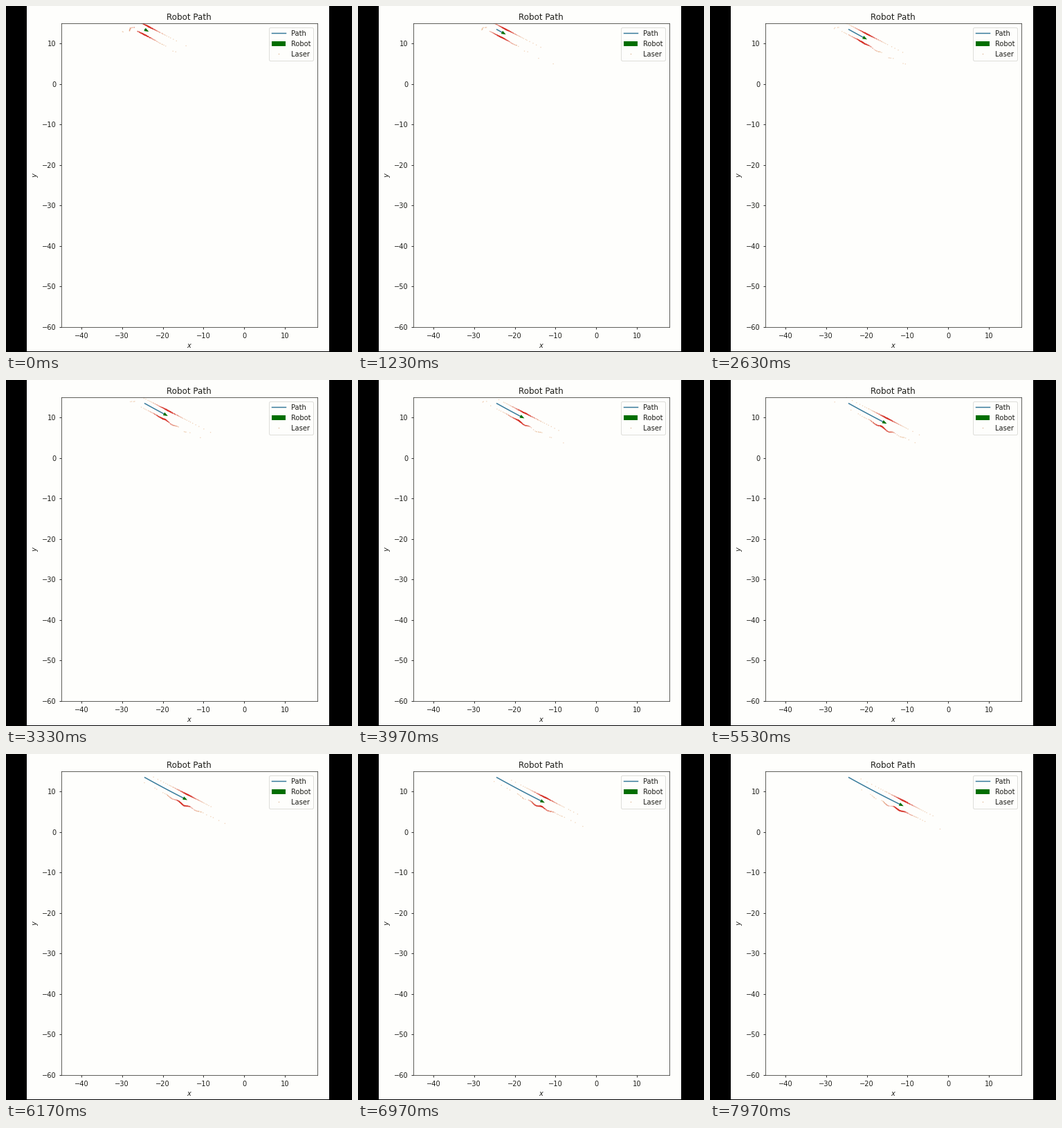
Recreate the animation shown at these times as a matplotlib script. Size 500x500 px, loop 8000 ms.

```python
import matplotlib.pyplot as plt
import numpy as np
from matplotlib.animation import FuncAnimation
from matplotlib.lines import Line2D
from matplotlib.patches import Patch, Polygon, Rectangle

FRAMES = 240
LOOP = 8000
SIZE = 500
PT = 0.715  # points per default-style point
PAPER = "#fefefc"
INK = "#1e1e1a"
PATH = "#35799a"
ROBOT = "#006e00"

plt.rcParams.update({
    "font.family": "DejaVu Sans",
    "font.size": 10 * PT,
    "axes.titlesize": 12 * PT,
    "axes.titlepad": 5.3 * PT,
    "axes.linewidth": 0.8 * PT,
    "axes.edgecolor": "#383834",
    "axes.labelcolor": INK,
    "text.color": INK,
})
for axis, pad in (("xtick", 4.9), ("ytick", 3.5)):
    plt.rcParams[axis + ".major.size"] = 3.5 * PT
    plt.rcParams[axis + ".major.pad"] = pad * PT
    plt.rcParams[axis + ".major.width"] = 0.8 * PT
    plt.rcParams[axis + ".labelcolor"] = INK

# Motion, in metres and seconds
START, END = -24.4, -10.95
SPEED, RAMP = 1.67, 0.5
MAX_RANGE = 16
NEAR = np.array([0.84, 0.14, 0.10, 0.36])
FAR = np.array([0.88, 0.62, 0.40, 0.45])
BODY = np.array([(0.62, 0), (-0.5, 0.42), (-0.5, -0.42)])


def robot_x(t):
    """Pull away gently, then hold a steady speed."""
    return -23.97 + SPEED * (t - RAMP * (1 - np.exp(-t / RAMP)))


def route_y(x):
    u = x - START
    return 13.47 - 0.526 * u - 0.0025 * u * (END - START - u)


def upper_y(x):
    return 3.3 - 0.516 * (x + 2.4)


def lower_y(x):
    bay = np.exp(-((x + 15) / 5) ** 2)
    return 1.4 - 0.509 * (x + 3.3) - bay * (0.5 - 0.25 * np.cos(2.1 * (x + 19.3)))


def wall(f, x0, x1, n):
    x = np.linspace(x0, x1, n)
    return np.column_stack([x, f(x)])


walls = [wall(upper_y, -28, 4, 2), wall(lower_y, -26.2, 2, 60),
         np.array([(-30.9, 13.8), (-29.7, 12.8)]),
         np.array([(-28.2, 13.1), (-27.9, 13.9), (-26.8, 14)])]
seg_a = np.vstack([w[:-1] for w in walls])
seg_d = np.vstack([np.diff(w, axis=0) for w in walls])


def scan(pos, rng):
    """Cast one turn of laser rays against the walls."""
    ang = np.radians(np.arange(360) + rng.uniform())
    ray = np.column_stack([np.cos(ang), np.sin(ang)])[:, None, :]
    rel = seg_a - pos
    det = ray[..., 0] * seg_d[:, 1] - ray[..., 1] * seg_d[:, 0]
    dist = (rel[:, 0] * seg_d[:, 1] - rel[:, 1] * seg_d[:, 0]) / det
    along = (rel[:, 0] * ray[..., 1] - rel[:, 1] * ray[..., 0]) / det
    hit = (dist > 0) & (along >= 0) & (along <= 1)
    reach = np.where(hit, dist, np.inf).min(axis=1)
    keep = reach < MAX_RANGE * rng.uniform(0.3, 1, len(ang))
    r = reach[keep] + rng.normal(0, 0.06, keep.sum())
    mix = np.clip((r - 1.8) / 3.2, 0, 1)[:, None]
    return pos + ray[keep, 0] * r[:, None], NEAR + (FAR - NEAR) * mix


fig = plt.figure(figsize=(5, 5), dpi=100, facecolor="black")
fig.add_artist(Rectangle((30 / SIZE, 1 / SIZE), 437 / SIZE, 1, fc=PAPER, lw=0,
                         transform=fig.transFigure, zorder=-1))
ax = fig.add_axes([79.5 / SIZE, 36.5 / SIZE, 370.5 / SIZE, 438.5 / SIZE], facecolor=PAPER)
ax.set(xlim=(-45, 18), ylim=(-60, 15), title="Robot Path",
       xticks=range(-40, 11, 10), yticks=range(-60, 11, 10))
ax.set_xlabel("$x$", labelpad=4 * PT)
ax.set_ylabel("$y$", labelpad=2.5 * PT)

laser = ax.scatter([], [], s=1.1, lw=0, zorder=2)
trail, = ax.plot([], [], color=PATH, lw=1.5 * PT, zorder=3)
robot = ax.add_patch(Polygon(BODY, closed=True, fc=ROBOT, lw=0, zorder=4))

ax.legend(
    [Line2D([], [], color=PATH, lw=1.5 * PT), Patch(fc=ROBOT, lw=0),
     Line2D([], [], ls="", marker="o", ms=1, mew=0, color="#dcb08c")],
    ["Path", "Robot", "Laser"], loc="upper right", borderaxespad=0.57,
    facecolor=PAPER, edgecolor="#dededa", framealpha=1).get_frame().set_linewidth(PT)


def update(i):
    x = robot_x(i * LOOP / FRAMES / 1000)
    pos = np.array([x, route_y(x)])
    xs = np.linspace(START, x, 40)
    trail.set_data(xs, route_y(xs))

    turn = np.arctan2(route_y(x + 0.5) - route_y(x - 0.5), 1)
    c, s = np.cos(turn), np.sin(turn)
    robot.set_xy(pos + BODY @ np.array([(c, s), (-s, c)]))

    pts, cols = scan(pos, np.random.default_rng(i))
    laser.set_offsets(pts)
    laser.set_facecolors(cols)
    return laser, trail, robot


anim = FuncAnimation(fig, update, frames=FRAMES, interval=LOOP / FRAMES,
                     repeat=True, repeat_delay=0)
plt.show()
```
